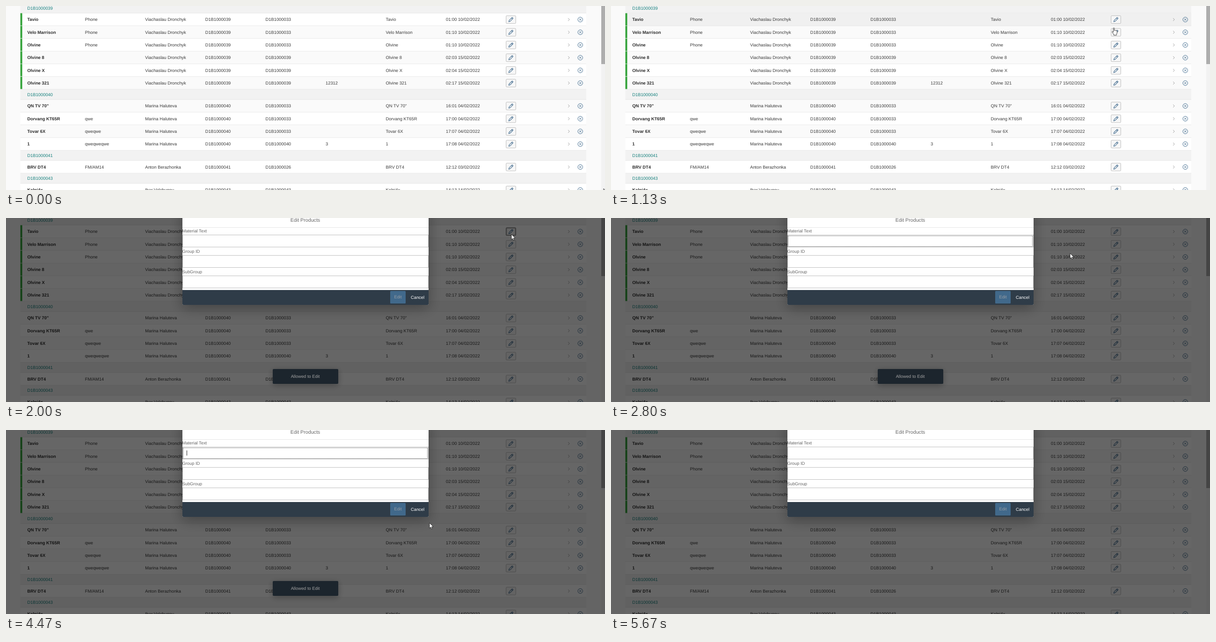
Write an HTML page that moves like this. It is 1280 by 396 pixels and loops after 5740 ms.

```html
<!DOCTYPE html>
<html lang="en">
<head>
<meta charset="utf-8">
<title>Edit Products</title>
<style>
html, body { margin: 0; width: 100%; height: 100%; overflow: hidden; background: #fafafa; }
body { position: relative; font: 9.333px "Liberation Sans", Arial, sans-serif; text-rendering: geometricPrecision; }
svg, .abs { position: absolute; }
#table { left: 0; top: 0; }
#table text { fill: #3a3a3a; }
#table .name { font-weight: bold; fill: #2c2c2c; }
#table .group { fill: #15807d; }
.icon { fill: none; stroke: #346187; stroke-width: .9; }
.pen { stroke-width: 1.05; }

.hover, .press, .focus, .modal, .ring, .caret, .toast, .arrow, .hand, .cursor {
  animation: 5740ms step-end infinite;
}
.hover { fill: #f0f0f0; animation-name: hover; }
.press { animation-name: press; }
.focus { animation-name: focus; }
.modal { inset: 0; animation-name: modal; }
.ring { left: .5px; right: .5px; top: .5px; bottom: .5px; border: 1px dotted #444; animation-name: ring; }
.caret { left: 8px; top: 7px; width: 1px; height: 11px; background: #222; animation-name: caret; }
.arrow { animation-name: arrow; }
.hand { animation-name: hand; }
.cursor { left: 0; top: 0; overflow: visible; animation-name: move; }
.cursor path { fill: #fff; stroke: #111; stroke-width: .8; stroke-linejoin: round; }

.dim { inset: 0; background: rgba(0, 0, 0, .6); }
.toast {
  left: 569.5px; top: 325.3px; width: 140px; height: 32px; line-height: 32px; border-radius: 2px;
  text-align: center; color: #a3a3a3; background: #1c252d; box-shadow: 0 3px 14px rgba(0, 0, 0, .3);
  animation-name: toast;
}
.dialog {
  left: 376.5px; top: -20px; width: 526px; height: 206.6px; border-radius: 2px; overflow: hidden;
  background: #fff; color: #666; box-shadow: 0 7px 30px rgba(0, 0, 0, .32);
}
.title { left: 0; right: 0; top: 9px; height: 31px; line-height: 32px; font-size: 10.667px; text-align: center; border-bottom: .67px solid #e5e5e5; }
.label { left: 0; line-height: 14px; }
.field { left: 0; right: 0; height: 25px; border: 1px solid #bfbfbf; border-width: 1px .5px; }
.foot { left: 0; right: 0; top: 174.6px; height: 32px; line-height: 32px; background: #2f3c48; color: #fff; }
.edit { left: 444.5px; top: 2.7px; width: 33px; height: 26.6px; line-height: 27px; border-radius: 1.5px; text-align: center; background: #5496cd; opacity: .5; }
.cancel { left: 488.5px; }

@keyframes hover {
  0% { transform: translateY(-60px); }
  1.15% { transform: translateY(332.83px); }
  2.3% { transform: translateY(283.5px); }
  3.47% { transform: translateY(228.83px); }
  4.63% { transform: translateY(-60px); }
  5.74% { transform: translateY(124.83px); }
  11.6% { transform: translateY(97.5px); }
  13.93% { transform: translateY(70.17px); }
  16.2% { transform: translateY(42.83px); }
  19.68% { transform: translateY(15.5px); }
  34.84%, 100% { transform: translateY(-60px); }
}
@keyframes press { 0% { opacity: 0; } 31.35% { opacity: 1; } 34.84%, 100% { opacity: 0; } }
@keyframes focus { 0% { opacity: 0; } 34.84% { opacity: 1; } 39.48%, 100% { opacity: 0; } }
@keyframes modal { 0% { opacity: 0; } 34.84%, 100% { opacity: 1; } }
@keyframes ring { 0% { opacity: 0; } 39.48% { opacity: 1; } 98.78%, 100% { opacity: 0; } }
@keyframes caret {
  0%, 48.78%, 67.42%, 85.88%, 100% { opacity: 0; }
  39.48%, 58%, 76.6% { opacity: 1; }
}
@keyframes toast {
  0% { opacity: 1; }
  85.8% { opacity: 1; animation-timing-function: steps(7); }
  94%, 100% { opacity: 0; }
}
@keyframes arrow { 0% { opacity: 1; } 1.15% { opacity: 0; } 34.84%, 100% { opacity: 1; } }
@keyframes hand { 0% { opacity: 0; } 1.15% { opacity: 1; } 34.84%, 100% { opacity: 0; } }
@keyframes move {
  0% { transform: translate(1277px, 393px); }
  1.15% { transform: translate(1277px, 393px); animation-timing-function: steps(5, start); }
  6.95% { transform: translate(1025px, 150px); animation-timing-function: steps(2, start); }
  9.28% { transform: translate(1012px, 138px); animation-timing-function: steps(2, start); }
  11.6% { transform: translate(1024px, 127px); animation-timing-function: steps(8, start); }
  20.88% { transform: translate(1081px, 36px); }
  23.17% { transform: translate(1080px, 35px); }
  39.48% { transform: translate(1080px, 35px); animation-timing-function: steps(9, start); }
  49.93% { transform: translate(981px, 76px); animation-timing-function: steps(5, start); }
  55.73% { transform: translate(955px, 82px); }
  74.21% { transform: translate(955px, 82px); animation-timing-function: steps(4, start); }
  78.86% { transform: translate(905px, 200px); animation-timing-function: steps(5, start); }
  84.67% { transform: translate(400px, 386px); animation-timing-function: steps(2, start); }
  86.98% { transform: translate(168px, 381px); }
  87% { transform: translate(114px, 390px); }
  88.15%, 100% { transform: translate(100px, 430px); }
}
</style>
</head>
<body>
<svg id="table" width="1280" height="396"></svg>

<div class="abs modal">
  <div class="abs dim"></div>
  <div class="abs toast">Allowed to Edit</div>
  <div class="abs dialog">
    <div class="abs title">Edit Products</div>
    <div class="abs label" style="top:41px">Material Text</div>
    <div class="abs field" style="top:56px"><div class="abs ring"></div><div class="abs caret"></div></div>
    <div class="abs label" style="top:85px">Group ID</div>
    <div class="abs field" style="top:100px"></div>
    <div class="abs label" style="top:129px">SubGroup</div>
    <div class="abs field" style="top:144px"></div>
    <div class="abs foot">
      <div class="abs edit">Edit</div>
      <div class="abs cancel">Cancel</div>
    </div>
  </div>
</div>

<svg class="cursor" width="16" height="18">
  <path class="arrow" d="M0 0V11.3L2.6 8.9L4.4 13L6.2 12.2L4.4 8.2H8Z"/>
  <path class="hand" transform="translate(-3.6 -1) scale(1.06)" d="M3 1.2Q4 -.2 5 1.2V6Q5.2 5.4 6.8 6Q7.1 5.4 8.7 6.2Q10.6 5.9 10.6 7.7V10.5L9.2 14V15.5H4V14.3L.8 9.6Q0 8 1.4 8L3 9.4Z"/>
</svg>

<script>
const ROW = 82 / 3, HEAD = 22, LEFT = 30.67, WIDTH = 1209.33;
const COLS = [45.5, 168.8, 297.2, 425.8, 554.6, 683, 811.6, 940];

// rows: name, kind, creator code, amount, time
const groups = [
  { id: 39, user: "Viachaslau Dronchyk", marked: true, rows: [
    ["Tavio", "Phone", 33, "", "01:00 10/02"],
    ["Velo Marrison", "Phone", 33, "", "01:10 10/02"],
    ["Olvine", "Phone", 33, "", "01:10 10/02"],
    ["Olvine 8", "", 39, "", "02:03 15/02"],
    ["Olvine X", "", 39, "", "02:04 15/02"],
    ["Olvine 321", "", 39, "12312", "02:17 15/02"]] },
  { id: 40, user: "Marina Haluteva", rows: [
    ["QN TV 70\"", "", 33, "", "16:01 04/02"],
    ["Dorvang KT65R", "qwe", 33, "", "17:00 04/02"],
    ["Tovar 6X", "qweqwe", 33, "", "17:07 04/02"],
    ["1", "qweqweqwe", 40, "3", "17:08 04/02"]] },
  { id: 41, user: "Anton Berazhonka", rows: [
    ["BRV DT4", "FM/AM14", 26, "", "12:12 03/02"]] },
  { id: 43, user: "Ihar Valchunou", rows: [
    ["Kelpi4x", "", 43, "", "14:13 14/02"]] }
];

const code = n => "D1B10000" + n;
const rect = (x, y, w, h, attrs) => `<rect x="${x}" y="${y}" width="${w}" height="${h}" ${attrs}/>`;
const text = (x, y, s, cls = "") => `<text x="${x}" y="${y}" class="${cls}">${s}</text>`;
const pencil = (y, attrs = "") => `<path class="icon pen" ${attrs} transform="translate(1079 ${y})"
  d="M-4.6 4.6l.8-2.9l6-6q.5-.5 1 0l1.1 1.1q.5.5 0 1l-6 6zM1.1-3.2l2.1 2.1"/>`;
const button = (y, attrs) => rect(1068.7, y - 8.3, 20.6, 16.7, `rx="1.5" stroke-width=".7" ${attrs}`);

let back = "", front = "", y = 15.5 - HEAD, n = 0;
const line = () => { front += rect(LEFT, y - .7, WIDTH, .7, 'fill="#e2e2e2"'); };

for (const g of groups) {
  back += rect(LEFT, y, WIDTH, HEAD, 'fill="#f2f2f2"');
  front += text(COLS[0], y + 14.3, code(g.id), "group");
  y += HEAD;
  n++;
  line();
  for (const [name, kind, by, amount, time] of g.rows) {
    const mid = y + 13.7;
    back += rect(LEFT, y, WIDTH, ROW, `fill="${n++ % 2 ? "#fff" : "#fafafa"}"`);
    const cells = [name, kind, g.user, code(g.id), code(by), amount, name, time + "/2022"];
    cells.forEach((s, i) => { front += text(COLS[i], y + 16.9, s, i ? "" : "name"); });
    front += button(mid, 'fill="#f7f7f7" stroke="#a3a3a3"') + pencil(mid)
      + `<path class="icon" style="stroke:#999" d="M1201 ${mid - 3}l3.2 3l-3.2 3"/>`
      + `<circle class="icon" cx="1227.2" cy="${mid}" r="5.2"/>`
      + `<path class="icon" d="M1224.8 ${mid - 2.4}l4.8 4.8m0-4.8l-4.8 4.8"/>`;
    if (g.marked) front += rect(LEFT, y, 4, ROW - .7, 'fill="#34a33a"');
    y += ROW;
    line();
  }
}

const first = 29.2;
const states = `<g class="press">${button(first, 'fill="#3b76a6" stroke="#3b76a6"')}${pencil(first, 'style="stroke:#fff"')}</g>`
  + `<g class="focus">${button(first, 'fill="none" stroke="#444"')}${rect(1070, first - 7, 18, 14, 'fill="none" stroke="#333" stroke-width=".7" stroke-dasharray="1 1"')}</g>`;
const bar = rect(1272, 0, 8, 396, 'fill="#f2f2f2"') + rect(1272, 0, 8, 125, 'fill="#adadad"');

document.getElementById("table").innerHTML =
  back + rect(LEFT, 0, WIDTH, ROW, 'class="hover"') + front + states + bar;
</script>
</body>
</html>
```
